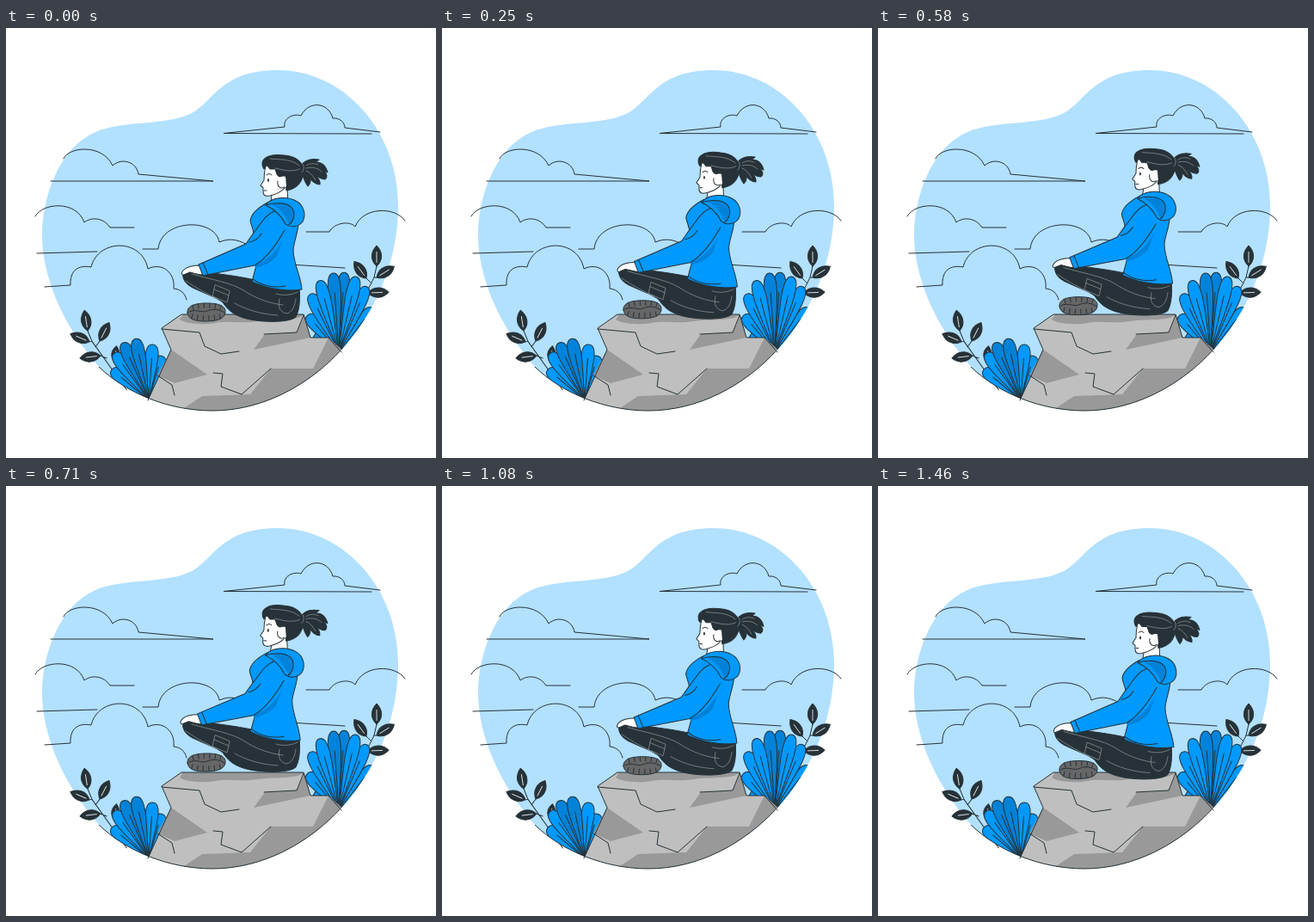
These frames come from a looping animation (500x500 px, 1500 ms). An HTML page:

```html
<!DOCTYPE html>
<html lang="en">
<head>
<meta charset="utf-8">
<title>Meditation</title>
<style>
  html, body { margin: 0; width: 100%; height: 100%; overflow: hidden; background: #fff; }
  svg { display: block; width: 100vw; height: 100vh; }
  .ink { stroke: #263238; stroke-width: 1; stroke-linecap: round; stroke-linejoin: round; }
  .line { fill: none; }
  .blue { fill: #09f; }
  .deep { fill: #0082d9; }
  .dark { fill: #263238; }
  .skin { fill: #fff; }
  .shade { fill: #999; }
  .seam { fill: none; stroke: #a4abae; stroke-width: .6; stroke-linecap: round; stroke-linejoin: round; }
  .tread { fill: none; stroke: #263238; stroke-width: 6; stroke-dasharray: 1 5.5; }
</style>
</head>
<body>
<svg viewBox="0 0 500 500">
  <defs>
    <path id="blob" d="M316 49C392 49 456 118 456 207C456 334 353 445 240 445C190 445 140 425 108 394C66 345 42 290 42 240C42 200 60 140 104 121C136 107 186 114 216 99C242 85 250 49 316 49Z"/>
    <clipPath id="inside"><use href="#blob"/></clipPath>
    <clipPath id="ground"><path d="M100 394H130L390 376V450H100Z"/></clipPath>
    <g id="leaf">
      <path class="ink dark" d="M0 0C-8 -7 -7 -17 0 -24C7 -17 8 -7 0 0Z"/>
      <path d="M0 -4V-17" stroke="#fff" stroke-width=".8"/>
    </g>
    <g id="sprig">
      <path class="ink line" d="M0 0L-3 13L-34 75M-3 13H0M-12 14L-6 20M-10 31L-17 35"/>
      <use href="#leaf"/>
      <use href="#leaf" transform="translate(-12 14) rotate(-36)"/>
      <use href="#leaf" transform="translate(0 13) rotate(58)"/>
      <use href="#leaf" transform="translate(-10 31) rotate(88)"/>
      <use href="#leaf" transform="translate(-25 41) rotate(-16) scale(.8)"/>
    </g>
  </defs>
  <use href="#blob" fill="#b2e0ff"/>

  <g class="ink line">
    <path d="M425 123L253 122.5L324 115C322 105 334 99 343 102C352 84 375 86 380 105C388 104 394 110 394 116L435 121"/>
    <path d="M67 152C72 138 112 134 124 160C135 150 152 156 154 170L241 178H52"/>
    <path d="M34 219C42 203 82 200 91 226C100 219 114 221 121 232H149M36 262L106 260"/>
    <path d="M159 257H177C180 222 243 220 248 249C262 243 272 247 284 254M330 275L394 279"/>
    <path d="M45 301L75 299C74 282 84 275 99 278C107 245 158 244 165 280C181 272 197 284 195 303C203 304 208 308 210 316"/>
    <path d="M349 237H376C382 226 400 224 406 231C415 208 452 207 464 224"/>
  </g>

  <use href="#sprig" transform="translate(431 277)"/>
  <use href="#sprig" transform="translate(95 352) scale(-1 1) rotate(9)"/>
  <g id="bushes" clip-path="url(#inside)"></g>

  <g id="rock">
    <g clip-path="url(#inside)">
      <path fill="#bfbfbf" d="M181 349L204 333H346L354 360H375L392 378V450H160L165 433L192 374Z"/>
      <path class="shade" d="M192 374L234 403L196 413L176 404ZM204 444L228 428L284 426L308 396H357L375 360L395 378L340 450H200ZM288 374L301 356L338 354L347 334L354 360Z"/>
      <path class="shade" d="M206 333H346C340 341 315 338 292 341C275 344 258 340 244 343C226 346 207 343 202 339Z"/>
    </g>
    <path class="ink line" d="M165 433L192 374L181 349L204 333H346L354 360H375L390 377M181 350L225 354L231 370L250 379L271 376M300 356L338 354L346 334M241 401L252 402L250 417L274 426L308 396M176 404L193 415L196 427"/>
    <use href="#blob" class="ink line" clip-path="url(#ground)"/>
  </g>

  <g id="body">
    <path class="ink dark" d="M206 284C204 291 209 298 217 302C232 309 246 314 252 319C258 328 264 333 276 337C295 343 330 343 337 336C342 327 342 312 341 302L289 293C270 288 230 284 212 281Z"/>
    <path class="seam" d="M209 294C222 303 234 309 246 315M243 299L240 312L257 319L260 306ZM242 304L259 311M216 286C236 292 262 296 276 305C288 313 304 320 322 322M266 320C278 327 296 333 316 334M314 309C324 312 333 310 339 307M318 315C316 324 318 330 326 332C333 331 336 323 337 315"/>
    <path fill="#666" class="ink" d="M211 331C210 322 222 320 234 320C247 320 256 323 255 331C254 339 243 341 232 341C220 341 212 339 211 331Z"/>
    <path class="ink line" d="M213 330C222 326 227 332 234 329S248 327 254 331"/>
    <path class="tread" d="M217 325C228 322 240 322 250 325M216 335C226 338 241 338 251 335"/>

    <g id="torso">
      <path class="ink skin" d="M226 276C216 276 210 278 207 281C203 285 204 289 209 286L214 284C219 285 223 287 230 287Z"/>
      <path class="ink skin" d="M310 188L307 208H328L327 184Z"/>
      <path class="ink blue" d="M304 203C293 209 285 217 284 224C285 230 288 234 288 240L291 276L286 295C302 303 326 307 344 304C343 288 334 274 334 258C335 246 341 236 340 222L325 203Z"/>
      <path class="deep" d="M289 276C302 272 314 260 322 246L315 265C308 273 299 277 290 279Z"/>
      <path class="ink blue" d="M312 213C301 217 295 230 288 238L279 251L224 275L229 288L289 276C300 270 312 256 324 235"/>
      <path class="ink line" d="M229 273L235 287M287 292C296 299 310 303 325 300M283 249C290 248 294 244 297 239"/>
      <path class="ink blue" d="M302 206C308 197 326 195 337 201C347 206 349 218 345 225C341 231 331 233 325 228C320 218 313 211 302 206Z"/>
      <path class="deep" d="M309 205C320 201 332 204 334 212C336 219 334 226 329 229C326 219 319 210 309 205Z"/>
      <path class="ink line" d="M302 206C315 202 328 203 333 210C337 217 334 225 329 229"/>

      <path class="ink skin" d="M302 160C300 168 300 174 300 177L296 183C297 185 299 185 299 186L299 190C299 195 302 196 307 195C315 193 320 191 324 186L329 163Z"/>
      <path class="ink line" d="M300 189H303M303 171C305 169 307 169 309 171"/>
      <ellipse class="dark" cx="305" cy="177" rx="1" ry="1.9"/>
      <path class="ink dark" d="M300 164C297 160 297 154 302 151C307 147 316 147 324 148C338 149 346 157 346 167C345 179 338 187 326 189C325 184 326 179 325 174C320 173 315 174 314 167L313 164L307 164L303 159Z"/>
      <path class="skin" d="M325 173C319 171 315 176 316 181C317 187 323 188 326 184Z"/>
      <path class="ink line" d="M316 178C315 184 319 188 324 185"/>
      <path class="seam" d="M307 152C318 153 332 152 341 160M313 163C324 166 336 168 343 163"/>
      <path class="ink dark" d="M342 161C346 155 352 151 364 153L360 156C368 156 372 160 374 168L369 166C374 170 374 174 371 176C366 176 362 173 359 170C363 174 366 178 365 182C360 182 355 178 353 173C355 177 354 181 351 184C347 179 346 173 343 167Z"/>
      <path class="seam" d="M344 157C347 160 347 164 344 168M349 160C354 157 358 157 363 159M349 163C357 161 363 163 367 167M349 166C354 168 357 172 360 177"/>
    </g>
  </g>
</svg>
<script>
  const LOOP = 1500, LIFT = 9.5, LEAN = .8;
  const $ = id => document.getElementById(id);

  // Blades spread from one root; the nearer to the axis, the longer and darker.
  function fan(x, y, axis, reach, angles) {
    return angles.map(angle => {
      const off = angle - axis;
      const len = reach * Math.cos(off * Math.PI / 180) ** 1.7;
      const tone = Math.abs(off) < 10 ? 'deep' : 'blue';
      return `<g class="ink ${tone}" transform="translate(${x} ${y}) rotate(${angle})">
        <path d="M0 0C-3 ${-len * .4} -15 ${-len} 0 ${-len}C15 ${-len} 3 ${-len * .4} 0 0Z"/>
        <path d="M0 0V${-len * .75}"/></g>`;
    }).join('');
  }
  $('bushes').innerHTML =
    fan(166, 433, -18, 74, [16, 4, -50, -36, -24, -12]) +
    fan(387, 377, 2, 93, [-54, 52, 38, -40, 4, -4, 23, 13, -26, -15]);

  function draw() {
    const phase = performance.now() % LOOP / LOOP;
    const rise = 1 - Math.abs(1 - 2 * phase);
    $('body').setAttribute('transform', `translate(0 ${-LIFT * rise})`);
    $('torso').setAttribute('transform', `rotate(${LEAN * rise} 310 165)`);
    requestAnimationFrame(draw);
  }
  draw();
</script>
</body>
</html>
```
